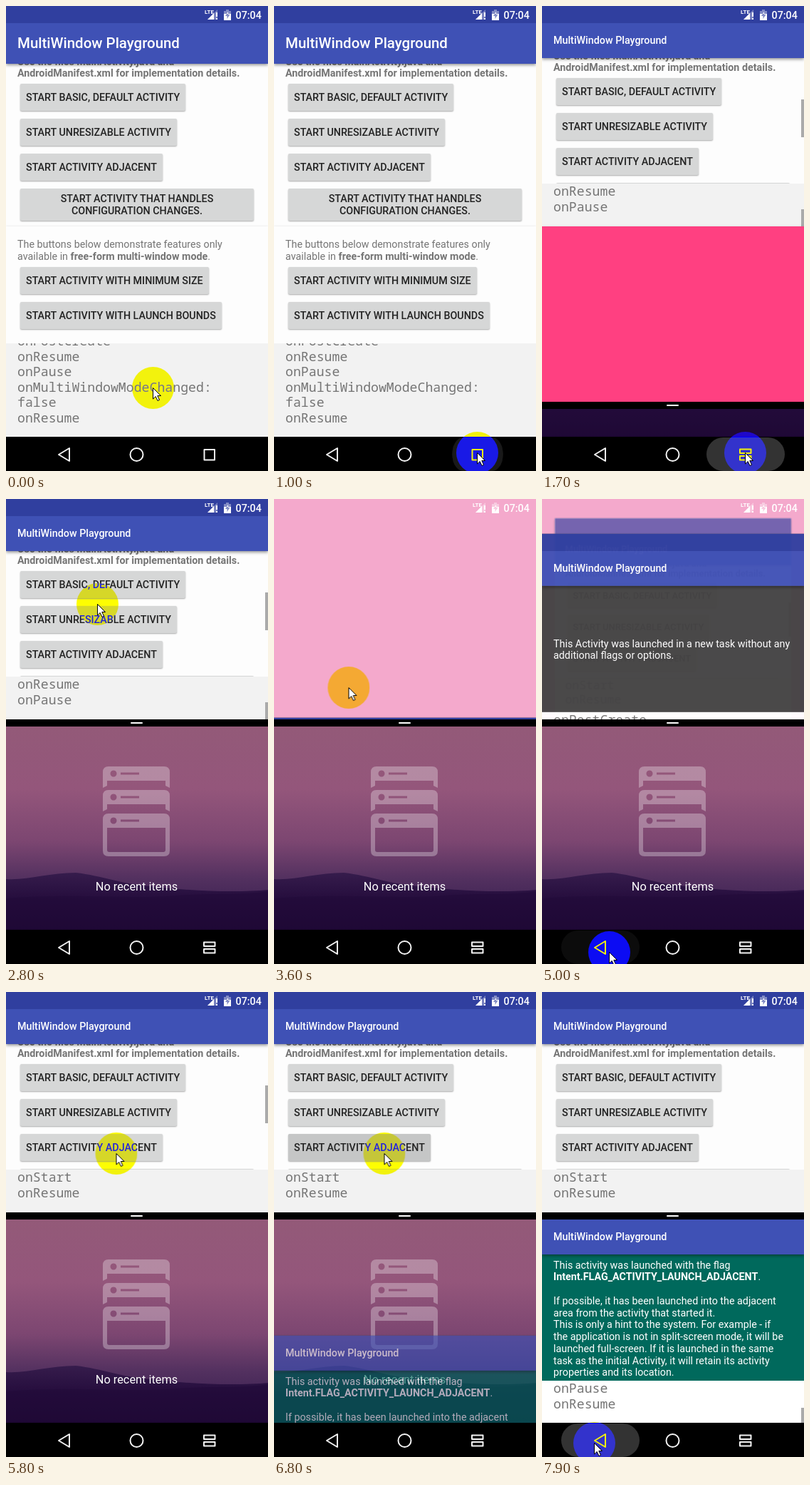
An HTML page for the animation above (8 s loop, 368 px wide and 652 px high).

```html
<!DOCTYPE html>
<html lang="en">
<head>
<meta charset="utf-8">
<title>Split screen demo</title>
<style>
html, body { margin: 0; width: 100%; height: 100%; overflow: hidden; }
#stage {
  position: relative; width: 368px; height: 652px; overflow: hidden; isolation: isolate;
  background: #f4a9cc; font: 14.3px/16.75px Roboto, sans-serif;
}
#stage div, #stage svg { position: absolute; box-sizing: border-box; }
#stage * { animation-duration: 8s; animation-iteration-count: infinite; animation-timing-function: linear; }
.pane { left: 0; width: 368px; overflow: hidden; }
.win { inset: 0; }
.bar {
  left: 0; top: 0; width: 368px; height: 73px; padding: 24px 16px 0; z-index: 1;
  display: flex; align-items: center; color: #fff; font-weight: 500; white-space: nowrap;
  background: linear-gradient(#303f9f 24px, #3f51b5 24px); box-shadow: 0 2px 4px #0006;
}
.text { left: 16px; white-space: pre; }
.log {
  left: 0; width: 368px; overflow: hidden; color: #757575;
  font: 18.2px/21.5px "Noto Sans Mono", monospace;
}
.thumb { right: 0; width: 4.5px; background: #aaa; }

/* main window */
#main { width: 368px; height: 604px; background: #fdfdfd; transform-origin: 184px 275px; animation-name: main; }
#main .bar { animation-name: bar; animation-timing-function: step-end; }
#body { inset: 0; color: #757575; animation-name: body; animation-timing-function: step-end; }
#main .log { top: 473px; bottom: 0; background: #f2f2f2; animation-name: panel; animation-timing-function: step-end; }
.btn {
  left: 20px; height: 38px; padding: 0 8px; border-radius: 2px; background: #d6d7d7;
  color: #222; font-weight: 500; white-space: nowrap; text-align: center;
  display: flex; align-items: center; justify-content: center; box-shadow: 0 1px 2px #0005;
}
#press1 { animation-name: press1; }
#press3 { animation-name: press3; }
#log1, #log2, #log3, #thumb1, #thumb2 { animation-timing-function: step-end; }
#log1 { top: -14px; animation-name: log1; }
#log2 { top: 0; animation-name: log2; }
#log3 { top: 0; animation-name: log3; }
#thumb1 { top: 131px; height: 53px; animation-name: thumb1; }
#thumb2 { top: 285px; height: 24px; animation-name: log2; }

/* second window */
#task { height: 309px; background: #424242; color: #fff; animation-name: task; }
#task .log, #near .log { background: #fff; }

/* lower half */
#dock { top: 309px; height: 295px; animation-name: dock; animation-timing-function: step-end; }
#shade { left: 0; top: -295px; width: 368px; height: 305px; background: linear-gradient(#ff4081 295px, #000 295px); animation-name: shade; }
#shade::after { content: ""; position: absolute; left: 175px; top: 299px; width: 17px; height: 2px; border-radius: 1px; background: #fff; }
#near { background: #00695c; color: #fff; animation-name: near; }
#near .bar { height: 49px; padding-top: 0; background: #3f51b5; }

/* system bars */
#nav { left: 0; top: 604px; width: 368px; height: 48px; background: #000; }
.ripple { top: 1px; width: 110px; height: 47px; border-radius: 24px; background: #333; }
#rippleR { left: 231px; animation-name: rippleR; }
#rippleB { left: 27px; animation-name: rippleB; }
#square { animation-name: log1; animation-timing-function: step-end; }
#split { animation-name: split; animation-timing-function: step-end; }

/* pointer */
#spot, #arrow { left: 0; top: 0; animation-name: move; }
#spot { width: 59px; height: 59px; margin: -29.5px; border-radius: 50%; background: #00f; mix-blend-mode: difference; }
#arrow { overflow: visible; }

@keyframes move {
  0% { translate: 206px 535px; animation-timing-function: ease-in-out; }
  10%, 25% { translate: 285px 626px; animation-timing-function: ease-in; }
  28.5% { translate: 325px 545px; }
  32% { translate: 219px 345px; animation-timing-function: ease-out; }
  35%, 42.5% { translate: 128px 147px; animation-timing-function: ease-in; }
  47.5% { translate: 54px 515px; }
  50% { translate: 48.5px 589px; animation-timing-function: ease-out; }
  55%, 63% { translate: 94px 635px; animation-timing-function: ease-in-out; }
  70% { translate: 140px 149px; animation-timing-function: ease-out; }
  72.3%, 88% { translate: 154.5px 226px; animation-timing-function: ease-in; }
  92.5% { translate: 85px 397px; }
  93.75% { translate: 60px 470px; }
  95.6% { translate: 50px 560px; animation-timing-function: ease-out; }
  98.2%, 100% { translate: 73px 632px; }
}
@keyframes bar { 0% { height: 81px; font-size: 20.44px; } 18.75%, 100% { height: 73px; font-size: 14.3px; } }
@keyframes body { 0% { translate: 0 0; } 18.75%, 100% { translate: 0 -8px; } }
@keyframes panel { 0% { top: 473px; } 18.75%, 100% { top: 249px; } }
@keyframes log1 { 0% { opacity: 1; } 18.75%, 100% { opacity: 0; } }
@keyframes log2 { 0% { opacity: 0; } 18.75% { opacity: 1; } 61%, 100% { opacity: 0; } }
@keyframes log3 { 0% { opacity: 0; } 61%, 100% { opacity: 1; } }
@keyframes split { 0% { opacity: 0; } 18.75%, 100% { opacity: 1; } }
@keyframes thumb1 {
  0% { opacity: 0; } 18.75% { opacity: 1; }
  77% { opacity: 1; animation-timing-function: linear; } 83%, 100% { opacity: 0; }
}
@keyframes main {
  0%, 40% { scale: 1; opacity: 1; animation-timing-function: ease-out; }
  45%, 61% { scale: .9; opacity: 0; }
  61.1% { scale: .9; opacity: .5; }
  62.5% { scale: .902; opacity: .65; animation-timing-function: ease-in-out; }
  67.5%, 100% { scale: 1; opacity: 1; }
}
@keyframes task {
  0%, 45% { translate: 0 309px; opacity: 1; animation-timing-function: cubic-bezier(.2, .6, .4, .95); }
  50% { translate: 0 9px; }
  51.8%, 60.6% { translate: 0 0; opacity: 1; animation-timing-function: ease-in; }
  62.5% { translate: 0 48px; opacity: .96; }
  66.5%, 100% { translate: 0 309px; opacity: .6; }
}
@keyframes dock { 0% { visibility: hidden; } 18.75%, 100% { visibility: visible; } }
@keyframes shade {
  0%, 18.75% { translate: 0 295px; animation-timing-function: ease-in; }
  21.25% { translate: 0 248px; animation-timing-function: ease-out; }
  23.75%, 100% { translate: 0 0; }
}
@keyframes near {
  0%, 83% { translate: 0 285px; opacity: .4; animation-timing-function: ease-out; }
  90%, 100% { translate: 0 0; opacity: 1; }
}
@keyframes press1 { 0%, 35.5% { background: #d6d7d7; } 38%, 41% { background: #b4b5b5; } 44%, 100% { background: #d6d7d7; } }
@keyframes press3 { 0%, 78% { background: #d6d7d7; } 80%, 83% { background: #b4b5b5; } 87%, 100% { background: #d6d7d7; } }
@keyframes rippleR {
  0%, 10% { scale: .3 1; opacity: 0; }
  15%, 24% { scale: 1; opacity: 1; }
  27.5%, 100% { scale: 1; opacity: 0; }
}
@keyframes rippleB {
  0%, 56% { scale: .3 1; opacity: 0; }
  58.5%, 60.5% { scale: 1; opacity: 1; }
  63.2% { scale: 1; opacity: 0; }
  63.3%, 97% { scale: .3 1; opacity: 0; }
  98.75%, 100% { scale: 1; opacity: 1; }
}
</style>
</head>
<body>
<div id="stage">
  <div class="pane" style="top:0;height:604px">
    <div id="main">
      <div class="bar">MultiWindow Playground</div>
      <div id="body">
        <div class="text" style="top:69.5px"><b>Use the files MainActivity.java and
AndroidManifest.xml for implementation details.</b></div>
        <div class="btn" id="press1" style="top:109px">START BASIC, DEFAULT ACTIVITY</div>
        <div class="btn" style="top:158px">START UNRESIZABLE ACTIVITY</div>
        <div class="btn" id="press3" style="top:207px">START ACTIVITY ADJACENT</div>
        <div class="btn" style="top:256px;width:328px;height:45px">START ACTIVITY THAT HANDLES<br>CONFIGURATION CHANGES.</div>
        <div class="text" style="top:326px">The buttons below demonstrate features only
available in <b>free-form multi-window mode</b>.</div>
        <div class="btn" style="top:366px">START ACTIVITY WITH MINIMUM SIZE</div>
        <div class="btn" style="top:415px">START ACTIVITY WITH LAUNCH BOUNDS</div>
      </div>
      <div class="log">
        <div class="text" id="log1">onPostCreate
onResume
onPause
onMultiWindowModeChanged:
false
onResume</div>
        <div class="text" id="log2">onResume
onPause</div>
        <div class="text" id="log3">onStart
onResume</div>
      </div>
      <div class="thumb" id="thumb1"></div>
      <div class="thumb" id="thumb2"></div>
    </div>
  </div>

  <div class="pane" style="top:0;height:309px">
    <div class="win" id="task">
      <div class="bar">MultiWindow Playground</div>
      <div class="text" style="top:145.5px">This Activity was launched in a new task without any
additional flags or options.</div>
      <div class="log" style="top:250px;bottom:0"><div class="text">onPostCreate
onResume</div></div>
      <div class="thumb" style="top:281px;bottom:0"></div>
    </div>
  </div>

  <div class="pane" id="dock">
    <svg width="368" height="295" viewBox="0 309 368 295">
      <defs>
        <linearGradient id="sky" x2="0" y2="1">
          <stop stop-color="#935a78"/><stop offset=".33" stop-color="#94567b"/>
          <stop offset=".58" stop-color="#7c4671"/><stop offset=".76" stop-color="#52305f"/><stop offset="1" stop-color="#30184a"/>
        </linearGradient>
        <linearGradient id="hill" x2="0" y2="1">
          <stop stop-color="#361c4c"/><stop offset=".5" stop-color="#240c3c"/><stop offset="1" stop-color="#1b0630"/>
        </linearGradient>
        <path id="card" fill-rule="evenodd" d="M136 405V383q0-8 8-8h78q8 0 8 8v22l-6-3v-7h-82v7zM151 380.500a4.500 4.500 0 1 0 .01 0zM161 383.500v3h26v-3z"/>
      </defs>
      <path fill="url(#sky)" d="M0 309h368v295H0z"/>
      <path fill="url(#hill)" d="M0 533C30 535 60 524 98 524 135 528 165 541 205 543 260 550 325 552 368 548V604H0z"/>
      <path fill="#220a3a" opacity=".6" d="M0 560C90 552 180 562 240 556 300 552 330 556 368 550V604H0z"/>
      <g fill="#fff" opacity=".3">
        <use href="#card"/><use href="#card" y="33"/>
        <path fill-rule="evenodd" d="M144 441h78q8 0 8 8v44q0 8-8 8h-78q-8 0-8-8v-44q0-8 8-8zM142 461v31q0 3 3 3h76q3 0 3-3v-31zM151 446.500a4.500 4.500 0 1 0 .01 0zM161 449.500v3h26v-3z"/>
      </g>
      <text x="183.500" y="548.500" text-anchor="middle" fill="#fff" font-size="16.350">No recent items</text>
    </svg>
    <div class="pane" style="top:10px;height:285px">
      <div class="win" id="near">
        <div class="bar">MultiWindow Playground</div>
        <div class="text" style="top:55.500px">This activity was launched with the flag
<b>Intent.FLAG_ACTIVITY_LAUNCH_ADJACENT</b>.

If possible, it has been launched into the adjacent
area from the activity that started it.
This is only a hint to the system. For example - if
the application is not in split-screen mode, it will be
launched full-screen. If it is launched in the same
task as the initial Activity, it will retain its activity
properties and its location.</div>
        <div class="log" style="top:226px;bottom:0"><div class="text">onPause
onResume</div></div>
        <div class="thumb" style="top:264px;bottom:0"></div>
      </div>
    </div>
    <div id="shade"></div>
  </div>

  <svg width="368" height="24" fill="#fff" style="left:0;top:0">
    <text x="279" y="11" font-size="8" font-weight="700" textLength="">LTE</text>
    <path opacity=".35" d="M283 19L297 5V19z"/>
    <path d="M283 19L292 10V19zM295 9h2v6h-2zM295 17h2v2h-2z"/>
    <path opacity=".4" d="M306 7h3V5h4v2h3v13h-10z"/>
    <path fill-rule="evenodd" d="M306 11h10v9h-10zM312 8l-4 6h2.500v4l4-6H312z"/>
    <text x="322.500" y="17.500" font-size="14.300" font-weight="500">07:04</text>
  </svg>

  <div id="nav">
    <div class="ripple" id="rippleB"></div>
    <div class="ripple" id="rippleR"></div>
    <svg width="368" height="48" viewBox="0 604 368 48" fill="none" stroke="#f2f2f2" stroke-width="2" stroke-linejoin="round" style="left:0;top:0">
      <path d="M74 629l15-9v18z"/>
      <circle cx="183.500" cy="629" r="9"/>
      <path id="square" d="M278.500 622h14.500v14.500h-14.500z"/>
      <path id="split" d="M278 621.500h15.500v5.500h-15.500zM278 631h15.500v5.500h-15.500z"/>
    </svg>
  </div>

  <div id="spot"></div>
  <svg id="arrow" width="12" height="19"><path d="M.5.5V16l3.700-3.500 2.800 6 2.500-1.200-2.700-5.800H11.500z" fill="#fff" stroke="#000"/></svg>
</div>
</body>
</html>
```
